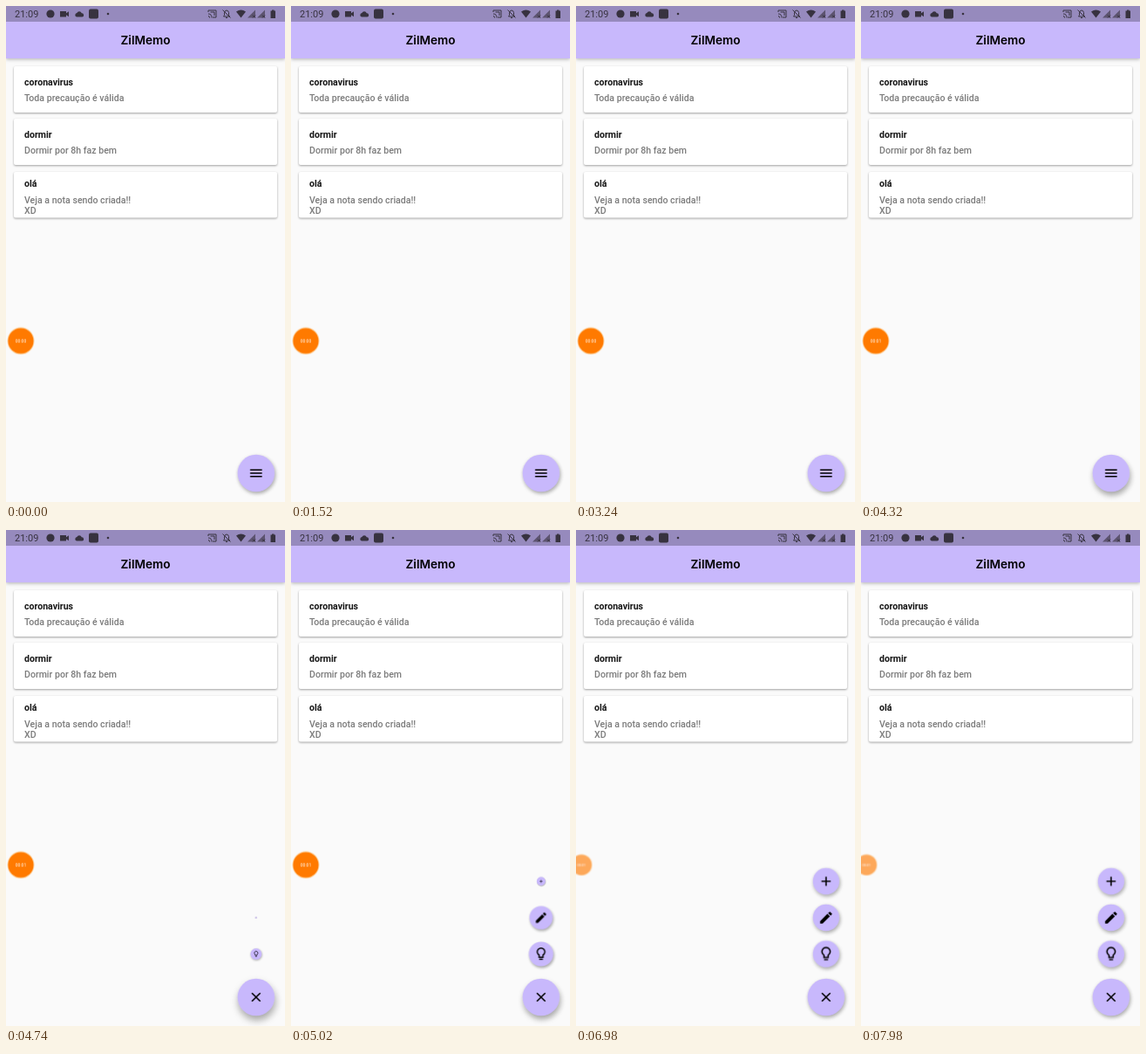
Recreate the animation shown at these times as an HTML page. Size 320x568 px, loop 8000 ms.

```html
<!DOCTYPE html>
<html lang="pt-BR">
<head>
<meta charset="utf-8">
<title>ZilMemo</title>
<style>
  html, body { margin: 0; width: 100%; height: 100%; overflow: hidden; background: #fafafa; }
  svg { display: block; width: 320px; height: 568px; }
  text { font-family: Roboto, sans-serif; }

  .heading { font: 600 13.6px Inter, sans-serif; text-anchor: middle; }
  .card rect { fill: #fff; filter: drop-shadow(.4px 1.2px 1.2px rgba(0, 0, 0, .36)); }
  .card text { font-size: 10.58px; font-weight: 500; fill: #7b7b7b; }
  .card .name { font-weight: 700; fill: #161616; }
  .clock { font-size: 11px; }
  .bubble text { font-size: 5px; fill: #fff; text-anchor: middle; }
  .lilac { fill: #c8b8fc; }
  .line { fill: none; stroke: #000; stroke-width: 1.6; }
  .raised { filter: drop-shadow(1px 2.5px 2px rgba(0, 0, 0, .34)); }

  .bubble { animation: dock 8s linear infinite, fade 8s linear infinite; }
  .fab { animation: press 8s linear infinite; }
  .before, .after { animation: hide 8s step-end infinite; }
  .after { animation-name: show; }
  .tick { --swap: tick; }
  .menu .before { animation-name: hideMenu; }
  .menu .after { animation-name: showClose; }
  .child { animation: 8s linear infinite; }
  .bulb { animation-name: growBulb; }
  .pencil { animation-name: growPencil; }
  .plus { animation-name: growPlus; }

  @keyframes hide { 0% { opacity: 1 } 48%, 100% { opacity: 0 } }
  @keyframes show { 0% { opacity: 0 } 48%, 100% { opacity: 1 } }
  @keyframes hideMenu { 0% { opacity: 1 } 55.5%, 100% { opacity: 0 } }
  @keyframes showClose { 0% { opacity: 0 } 55.5%, 100% { opacity: 1 } }

  @keyframes dock {
    0%, 73.5% {
      transform: translate(17px, 383.5px);
      animation-timing-function: cubic-bezier(.2, .6, .35, 1);
    }
    82%, 100% { transform: translate(6.3px, 383.5px) scale(.8) }
  }
  @keyframes fade { 0%, 73.5% { opacity: 1 } 82%, 100% { opacity: .64 } }
  @keyframes press {
    0%, 52.3% { filter: drop-shadow(1px 2.5px 2px rgba(0, 0, 0, .34)) }
    55%, 60% { filter: drop-shadow(1px 5px 4px rgba(0, 0, 0, .34)) }
    68%, 100% { filter: drop-shadow(1px 2.5px 2px rgba(0, 0, 0, .34)) }
  }

  /* The buttons start one after another and all finish together. */
  @keyframes growBulb { 0%, 56.32% { transform: scale(0) } 63.3%, 100% { transform: scale(1) } }
  @keyframes growPencil { 0%, 59.01% { transform: scale(0) } 63.3%, 100% { transform: scale(1) } }
  @keyframes growPlus { 0%, 62.5% { transform: scale(0) } 63.3%, 100% { transform: scale(1) } }
</style>
</head>
<body>
<svg viewBox="0 0 320 568">
  <rect width="320" height="568" fill="#fafafa"/>

  <rect class="lilac" width="320" height="60" style="filter: drop-shadow(0 1.5px 2px rgba(0, 0, 0, .3))"/>
  <rect width="320" height="18" fill="#968abd"/>
  <text class="heading" x="160" y="44">ZilMemo</text>

  <!-- Status bar -->
  <g fill="#37323f">
    <text class="clock" x="10" y="13">21:09</text>
    <circle cx="51" cy="9" r="4.6"/>
    <path d="M62 6h7v2.3l3-2v6l-3-2v2.2h-7z"/>
    <path d="M81 12.5a2.3 2.3 0 0 1 .3-4.5a3 3 0 0 1 5.5 .3a2.1 2.1 0 0 1 .5 4.2z"/>
    <rect x="95" y="3.5" width="11" height="11" rx="2"/>
    <circle cx="117" cy="9" r="1.3"/>
    <path d="M264 6.5q5.5-4 11 0l-5.5 7z"/>
    <path d="M286 4.5v9h-9zM297 4.5v9h-9z" fill="#5d5470"/>
    <path d="M283 10.5l3 3m0-3l-3 3M294 10.5l3 3m0-3l-3 3" stroke="#37323f"/>
    <path d="M303.5 5.5h1.5v-1h2.5v1h1.5v8.5h-5.5z"/>
    <g fill="none" stroke="#37323f">
      <path d="M232 7v-2h9v8h-4M232 9q4 0 4 4.5M232 11.5q1.5 0 1.5 2M234.5 7h4.5v4"/>
      <path d="M249.5 12h7l-1-1.5v-3q-.5-2.5-2.5-2.5t-2.5 2.5v3zM252 13.5h2M248.5 4.500l9 9"/>
    </g>
  </g>

  <g class="card">
    <rect x="9" y="69" width="302" height="53" rx="2"/>
    <text class="name" x="21" y="90.5">coronavirus</text>
    <text x="21" y="108.5">Toda precaução é válida</text>
  </g>
  <g class="card">
    <rect x="9" y="129" width="302" height="53" rx="2"/>
    <text class="name" x="21" y="150.5">dormir</text>
    <text x="21" y="168.8">Dormir por 8h faz bem</text>
  </g>
  <g class="card">
    <rect x="9" y="190" width="302" height="52.5" rx="2"/>
    <text class="name" x="21" y="207">olá</text>
    <text x="21" y="225.5">Veja a nota sendo criada!!</text>
    <text x="21" y="237.5">XD</text>
  </g>

  <g class="bubble">
    <circle r="15.5" fill="#ffb35c" opacity=".65"/>
    <circle r="14.5" fill="#ff7a00"/>
    <text class="before" y="2">00:00</text>
    <text class="after" y="2">00:01</text>
  </g>

  <!-- Speed dial -->
  <g transform="translate(286.8 402.3)">
    <g class="child plus">
      <circle class="lilac raised" r="15.2"/>
      <path class="line" d="M-5.3 0h10.6M0-5.3v10.6"/>
    </g>
  </g>
  <g transform="translate(286.8 443.9)">
    <g class="child pencil">
      <circle class="lilac raised" r="15.2"/>
      <path transform="scale(.756) translate(-12 -12)" d="M3 17.25V21h3.75L17.81 9.94l-3.75-3.75zM20.71 7.04a1 1 0 0 0 0-1.41l-2.34-2.34a1 1 0 0 0-1.41 0l-1.83 1.83 3.75 3.75z"/>
    </g>
  </g>
  <g transform="translate(286.8 485.5)">
    <g class="child bulb">
      <circle class="lilac raised" r="15.2"/>
      <path class="line" d="M-2.4 4v-2.6a4.7 4.7 0 1 1 4.8 0v2.6zM-2.3 6.5h4.6"/>
    </g>
  </g>
  <g class="menu" transform="translate(286.8 535)">
    <circle class="lilac fab" r="21.3"/>
    <path class="line before" d="M-6.8-3.8h13.6M-6.8 0h13.6M-6.8 3.8h13.6"/>
    <path class="line after" d="M-4.8-4.8l9.6 9.6M-4.8 4.8l9.6-9.6"/>
  </g>
</svg>
</body>
</html>
```
